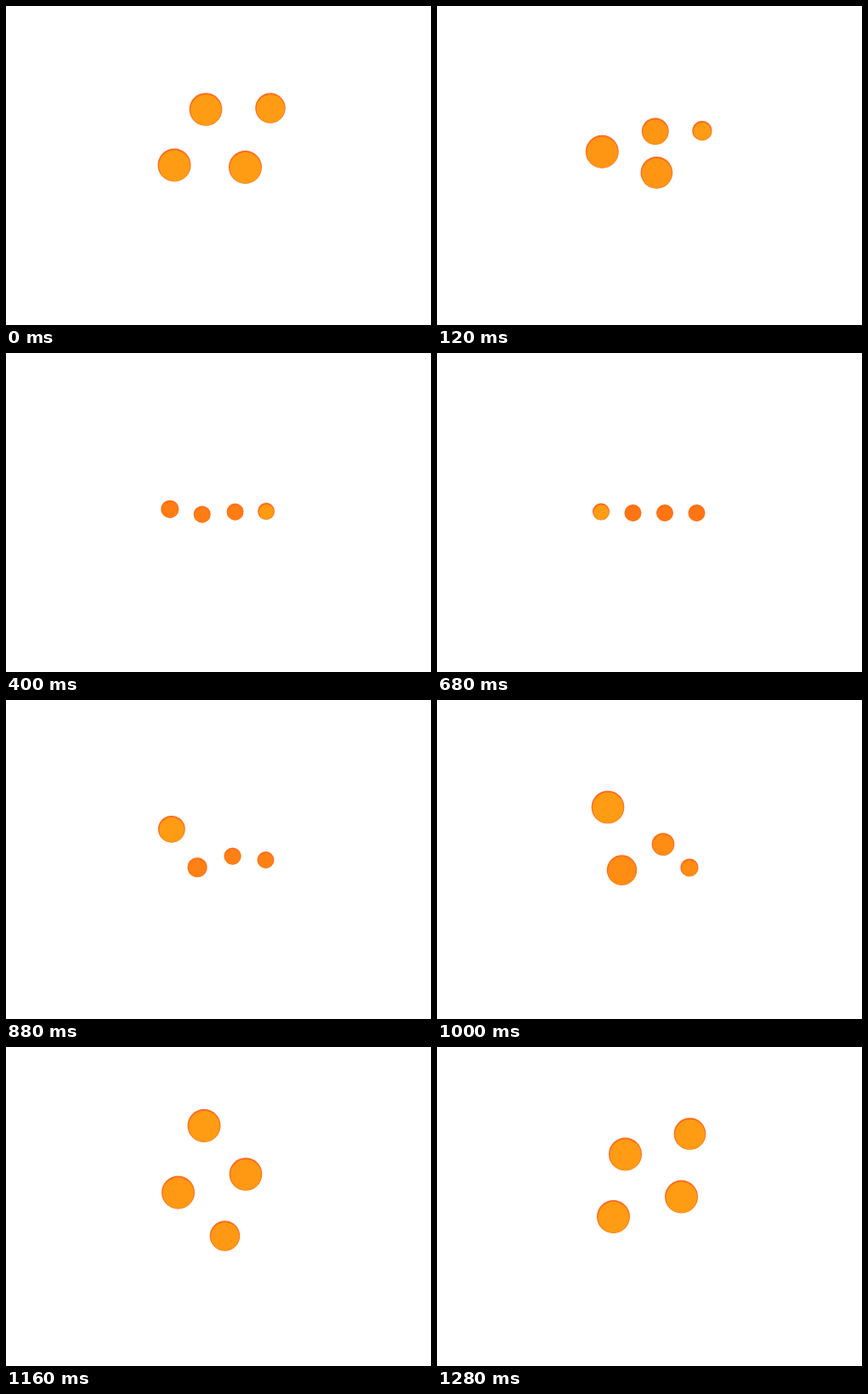
Animation, 500 px wide and 375 px high, one loop 1.32 s. Source, as an HTML page with a canvas:

```html
<!DOCTYPE html>
<html lang="en">
<head>
<meta charset="utf-8">
<title>Juggling dots</title>
<style>
html, body { margin: 0; height: 100%; overflow: hidden; background: #fff; }
canvas { display: block; }
</style>
</head>
<body>
<canvas id="stage" width="500" height="375"></canvas>
<script>
const LOOP = 1320, STEP = 40, START = 580, STAGGER = 80;
const REST_Y = 188, SMALL = 10, LARGE = 19.5;
const ctx = document.getElementById('stage').getContext('2d');

// Key poses of the juggle: every dot passes through its own points at shared times.
const poseTimes = [1000, 1160, 1280, 1320, 1560];
const poses = [
  [[201, 126], [233, 92.5], [297.5, 102], [311, 120], [309.5, 168]],
  [[217.5, 200], [202.5, 171], [221.5, 126], [235, 121.5], [272, 172]],
  [[266, 169.5], [282, 149.5], [287.5, 176], [281.5, 189.5], [239, 197.5]],
  [[297, 197], [257.5, 222], [207.5, 199.5], [198, 187], [193, 163.5]]
];

const slotX = k => 193 + 37.5 * k;
const clamp = v => Math.min(1, Math.max(0, v));
const ease = u => u < .5 ? 4 * u ** 3 : 1 - 4 * (1 - u) ** 3;

// Staggered take-off from the row, common landing in the mirrored slot.
const paths = poses.map((points, k) => [
  [640 + STAGGER * k, slotX(k), REST_Y],
  ...points.map(([x, y], i) => [poseTimes[i], x, y]),
  [1780, slotX(3 - k), REST_Y]
]);

function slope(path, i, axis) {
  const a = path[i - 1], b = path[i + 1];
  return a && b ? (b[axis] - a[axis]) / (b[0] - a[0]) : 0;
}

// Smooth cubic through the path points.
function pointAt(path, time) {
  let i = 0;
  while (i < path.length - 2 && time > path[i + 1][0]) i++;
  const a = path[i], b = path[i + 1], span = b[0] - a[0];
  const u = clamp((time - a[0]) / span), v = 1 - u;
  return [1, 2].map(axis =>
    a[axis] * v * v * (1 + 2 * u) + b[axis] * u * u * (1 + 2 * v) +
    span * u * v * (v * slope(path, i, axis) - u * slope(path, i + 1, axis)));
}

function disc(x, y, r, color) {
  ctx.fillStyle = color;
  ctx.beginPath();
  ctx.arc(x, y, r, 0, 2 * Math.PI);
  ctx.fill();
}

function draw(now) {
  const phase = Math.floor(now / STEP) * STEP % LOOP;
  const time = phase < START ? phase + LOOP : phase;
  const warmth = .5 + .5 * Math.cos(2 * Math.PI * (time - 1280) / LOOP);
  ctx.clearRect(0, 0, 500, 375);
  paths.forEach((path, k) => {
    const [x, y] = pointAt(path, time);
    const fromPeak = Math.abs(time - STAGGER * k - 1120);
    const r = SMALL + (LARGE - SMALL) * ease(clamp((460 - fromPeak) / 404));
    const glow = k ? warmth : 1;
    disc(x, y, r, `rgb(255, ${112 - 4 * glow}, ${24 + 8 * glow})`);
    disc(x + .2, y + .8, r - 1.2, `rgb(255, ${115 + 41 * glow}, 19)`);
  });
}

function tick() {
  draw(performance.now());
  requestAnimationFrame(tick);
}
tick();
</script>
</body>
</html>
```
